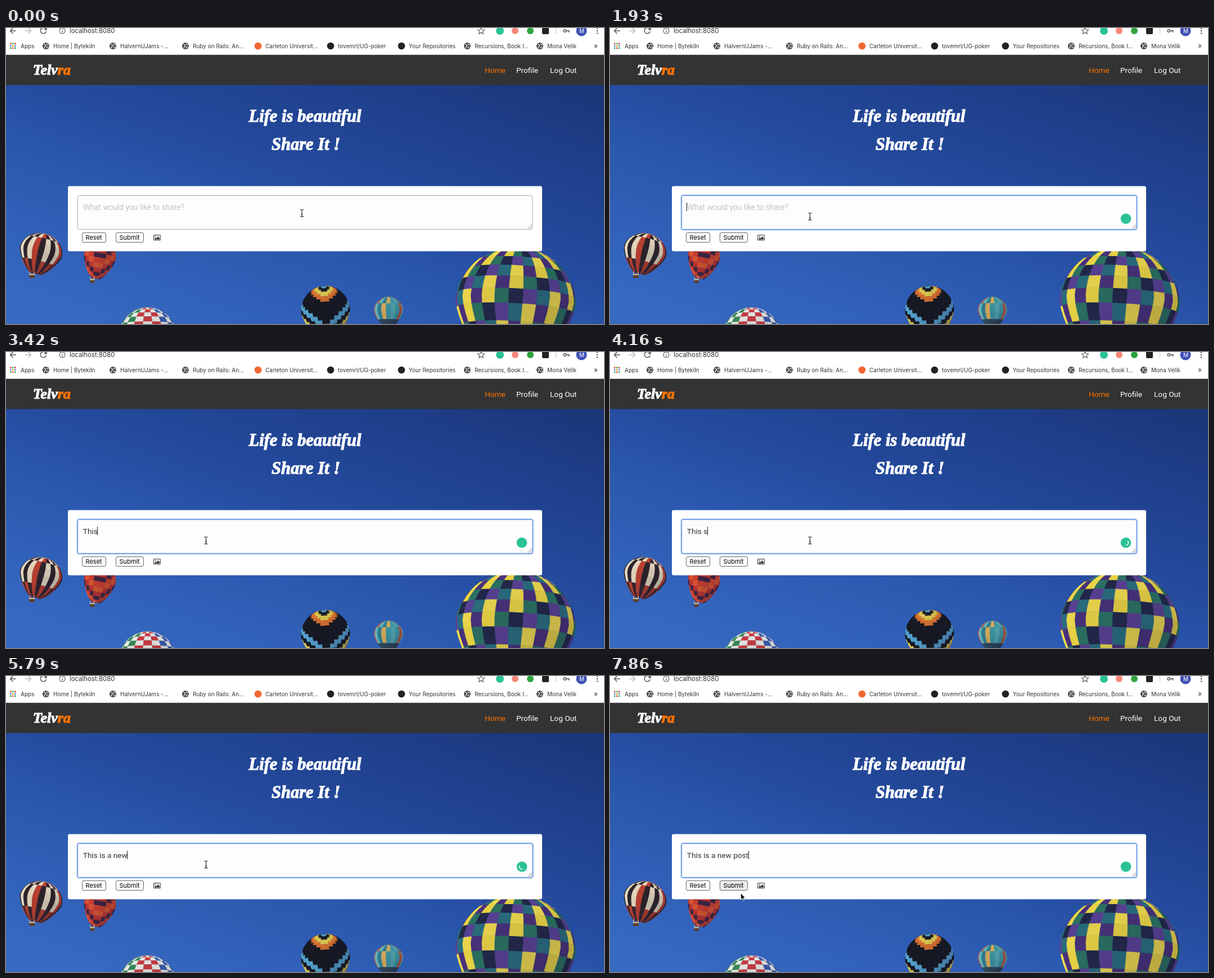
An HTML page that plays this animation: 1063 px wide and 527 px high, repeating every 8 s.

```html
<!DOCTYPE html>
<html lang="en">
<head>
<meta charset="utf-8">
<title>Share a post</title>
<style>
html, body { margin: 0; width: 100%; height: 100%; overflow: hidden; }
svg { display: block; width: 100vw; height: 100vh; }
text { white-space: pre; }
.ui { font: 10px Inter, sans-serif; fill: #333; }
.page { font: 13.65px Roboto, sans-serif; fill: #333; }
.script { font: italic bold 30.5px "Liberation Serif", serif; fill: #fff; stroke: #fff; stroke-width: 1.1; }
.line { fill: none; stroke: #555; stroke-width: 1.5; }
</style>
</head>
<body>
<svg viewBox="0 0 1063 527">
  <defs>
    <linearGradient id="sky" gradientUnits="userSpaceOnUse" x1="230" y1="550" x2="448" y2="-83">
      <stop offset="0" stop-color="#3769c1"/>
      <stop offset=".37" stop-color="#2a58ae"/>
      <stop offset=".54" stop-color="#254c9f"/>
      <stop offset=".8" stop-color="#1f408c"/>
      <stop offset="1" stop-color="#1b377a"/>
    </linearGradient>
  </defs>
  <rect width="1063" height="527" fill="url(#sky)"/>
  <g id="balloons"></g>

  <rect width="1063" height="48" fill="#fff"/>
  <rect y="47" width="1063" height="1" fill="#c8c8c8"/>
  <g class="line">
    <path d="M18 5H8M12.5 0L7.5 5l5 5"/>
    <path d="M34 5h10M39.5 0l5 5-5 5" stroke="#bbb"/>
    <path d="M71 2A5.2 5.2 0 1 0 71.5 6M72 -1v4h-4"/>
    <circle cx="100" cy="5" r="5" stroke-width="1.1"/>
    <path d="M100 4.5v3.5M100 2v1.2" stroke-width="1.2"/>
    <path d="M844.5 -1l1.7 4 4.3.3-3.3 2.8 1.1 4.2-3.8-2.3-3.8 2.3 1.1-4.2-3.3-2.8 4.3-.3z" stroke-width="1.1"/>
    <path d="M977.5 0v11" stroke="#ccc" stroke-width="1"/>
    <circle cx="993.5" cy="5" r="2.3"/><path d="M996 5h6M1000.5 5v3"/>
  </g>
  <circle cx="878" cy="5" r="7" fill="#2bc196"/>
  <circle cx="905" cy="5" r="6" fill="#f5877a"/>
  <circle cx="932" cy="5" r="6" fill="#2da33c"/>
  <rect x="953" y="-1" width="12" height="12" rx="2" fill="#222"/>
  <circle cx="1023" cy="5" r="9.5" fill="#3f51b5"/>
  <text x="1019" y="8.5" class="ui" style="fill:#fff">M</text>
  <g fill="#555"><circle cx="1051" cy=".5" r="1.3"/><circle cx="1051" cy="5" r="1.3"/><circle cx="1051" cy="9.5" r="1.3"/></g>
  <text x="113" y="9" class="ui" style="font-size:11.4px">localhost:8080</text>
  <g id="bookmarks" class="ui"></g>
  <text x="1045" y="36" class="ui" style="font-size:12px">»</text>

  <rect y="48" width="1063" height="53.5" fill="#333"/>
  <text x="48" y="82.5" class="script" style="font-size:26px">Telv<tspan fill="#ff7300" stroke="#ff7300">ra</tspan></text>
  <g class="page" style="fill:#fff">
    <text x="851" y="80" fill="#ff7300">Home</text>
    <text x="907" y="80">Profile</text>
    <text x="967" y="80">Log Out</text>
  </g>
  <g class="script" text-anchor="middle">
    <text x="531.5" y="167">Life is beautiful</text>
    <text x="533" y="217">Share It !</text>
  </g>

  <rect x="110" y="281.5" width="843" height="116" rx="3" fill="#fff"/>
  <rect id="glow" x="127" y="298" width="809.5" height="61" rx="3" fill="none" stroke="#5b95e8" stroke-opacity=".45" stroke-width="3.5"/>
  <rect id="box" x="127.5" y="298.5" width="808.5" height="60" rx="3" fill="#fdfdfd"/>
  <path d="M928 357l7-7M932 357l3-3" class="line" style="stroke:#888;stroke-width:1"/>
  <text id="hint" x="137" y="324" class="page" style="font-weight:300;font-size:13.9px;fill:#aaa">What would you like to share?</text>
  <text id="typed" x="136.8" y="324" class="page"></text>
  <rect id="caret" y="311" width="1" height="15" fill="#222"/>
  <g id="badge">
    <circle cx="917" cy="339.5" r="9.3" fill="#2bc196"/>
    <path id="spin" d="M920.2 336.3A4.5 4.5 0 0 1 917 344" fill="none" stroke="#fff" stroke-width="1.4"/>
  </g>
  <g fill="#fff" stroke="#666">
    <rect x="135.5" y="364.5" width="42" height="17" rx="2.5"/>
    <rect id="submit" x="195.5" y="364.5" width="49" height="17" rx="2.5"/>
  </g>
  <g class="ui" style="font-size:11px;fill:#000">
    <text x="141.5" y="377.3">Reset</text>
    <text x="201.5" y="377.3">Submit</text>
  </g>
  <rect x="262.5" y="368.7" width="12" height="9" rx="1" class="line" style="stroke-width:1.2"/>
  <path d="M264 376.500v-1.500l2-2 1.300 1.300 3.200-3.300 2.700 2.700v2.800z" fill="#444"/>
  <circle cx="265.5" cy="371.3" r="1" fill="#444"/>

  <path id="beam" d="M-3 -6.5Q0 -6.5 0 -4.5Q0 -6.5 3 -6.5M0 -5V5M-3 6.5Q0 6.5 0 4.5Q0 6.5 3 6.5M-1.5 2h3" fill="none" stroke="#222" stroke-width="1.1"/>
  <path id="arrow" d="M0 0v11l2.6-2.4 1.7 4 1.9-.8-1.7-3.9h3.5z" fill="#000" stroke="#fff" stroke-width=".8"/>
</svg>
<script>
const $ = id => document.getElementById(id);
const show = (id, on) => $(id).setAttribute('visibility', on ? 'visible' : 'hidden');

// Bookmarks: icon centre, icon colour (empty means a globe), label
const globe = x => `<circle cx="${x}" cy="32" r="6" fill="#444"/>
  <path d="M${x - 4} 29l3 1 1 2-2 1-1 3M${x + 1} 27.5l1 2 3 1M${x + 1} 36l1-2h3" fill="none" stroke="#fff" stroke-width="1.2"/>`;
const marks = [
  [71, '', 'Home | Bytekiln'], [190, '', 'HalvernUJams -...'], [319, '', 'Ruby on Rails: An...'],
  [448, '#f0652f', 'Carleton Universit...'], [577, '#222', 'tovemrl/UG-poker'], [703, '#222', 'Your Repositories'],
  [820, '', 'Recursions, Book I...'], [949, '', 'Mona Velik']
];
const dots = ['#e84335', '#f9ab00', '#34a853', '#4285f4'];
let bar = '<text x="26" y="35.5">Apps</text>';
for (let i = 0; i < 9; i++) {
  const row = Math.floor(i / 3);
  bar += `<rect x="${7 + i % 3 * 4}" y="${26.5 + row * 4}" width="2.6" height="2.6" fill="${dots[(i * 2 + row) % 4]}"/>`;
}
for (const [x, color, label] of marks)
  bar += (color ? `<circle cx="${x}" cy="32" r="6.3" fill="${color}"/>` : globe(x)) +
    `<text x="${x + 13}" y="35.5">${label}</text>`;
$('bookmarks').innerHTML = bar;

// Teardrop envelope of n gores and m rings; paint(i, j) colours a patch, shaded towards the lower right
function balloon(cx, top, w, h, tilt, n, m, bow, paint) {
  const end = Math.PI * .9;
  const drop = c => c > 0 ? 1 - c : 1 - 1.3 * c;
  const point = (u, v) => {
    const p = v * end, a = (u - .5) * Math.PI, c = Math.cos(p);
    const r = Math.sin(p) * (1 + .3 * Math.min(0, c));
    return (cx + w / 2 * r * Math.sin(a)).toFixed(1) + ' ' +
      (top + h * drop(c) / drop(Math.cos(end)) - bow * w * r * Math.cos(a)).toFixed(1);
  };
  let out = `<g transform="rotate(${tilt} ${cx} ${top + h / 2})" stroke-width=".4">`;
  for (let j = 0; j < m; j++) for (let i = 0; i < n; i++) {
    const pts = [[0, 0], [.5, 0], [1, 0], [1, .5], [1, 1], [.5, 1], [0, 1], [0, .5]]
      .map(([du, dv]) => point((i + du) / n, (j + dv) / m));
    const shade = 60 * (i / n) * (j / m);
    const color = `color-mix(in srgb, ${paint(i, j)}, #12142c ${shade.toFixed()}%)`;
    out += `<path d="M${pts.join('L')}Z" style="fill:${color};stroke:${color}"/>`;
  }
  return out + '</g>';
}
const basket = (x, y, w) =>
  `<path d="M${x - w / 2} ${y}L${x - w / 3} ${y + 5}M${x + w / 2} ${y}L${x + w / 3} ${y + 5}" stroke="#ddc9a8"/>
   <rect x="${x - w / 2}" y="${y + 4}" width="${w}" height="7" rx="1.5" fill="#5b4030"/>
   <rect x="${x - w / 2}" y="${y + 4}" width="${w}" height="2" fill="#d8bd8e"/>`;
const pick = (list, k) => list[Math.floor(k) % list.length];

const bands = ['#c8432f', '#2e2429', '#efe0c4', '#2e2429', '#efe0c4'];
const flames = ['#d9402e', '#e5592f', '#c93430', '#3f2643'];
const checks = ['#3b8b55', '#cf3b40', '#3c5fb0'];
const chevrons = ['#17181f', '#58a9d6', '#17181f', '#e8d34e', '#e5762c', '#17181f', '#17181f'];
const stripes = ['#3f9fac', '#c4573f', '#65bcc0', '#2f8194', '#e0b35c', '#3f9fac', '#58b0b8'];
const quilt = ['#f4de4e', '#4a327d', '#f0d945', '#2c7464', '#23284a', '#5b4296', '#2a6f80'];
$('balloons').innerHTML =
  balloon(166, 377, 57, 70, 11, 8, 12, .05, (i, j) => pick(flames, j + Math.abs(i - 3.5) + .5)) + basket(153.5, 443, 8) +
  balloon(61, 366, 77, 73, 14, 11, 7, .04, (i, j) => j > 4 ? pick(['#c8432f', '#39262a'], i) : pick(bands, i + (j > 1))) + basket(46, 434, 10) +
  balloon(252, 498, 104, 118, 0, 9, 13, .04, (i, j) => (i + j) % 2 ? '#eeeeea' : pick(checks, i / 3)) +
  balloon(568.5, 460, 87, 98, -4, 16, 22, .05, (i, j) => pick(chevrons, (j + Math.abs(i - 7.5)) / 2)) +
  balloon(680, 479, 52, 54, 0, 9, 8, .03, (i, j) => j > 5 ? '#30485c' : pick(stripes, i + j / 3)) +
  balloon(905, 391, 214, 226, 3, 13, 12, .06, (i, j) => pick(quilt, i + 2 * j));

// Cursor: time, x, y, arrow shape
const moves = [
  [0, 526, 329.5], [150, 468, 337], [290, 415, 342], [740, 400, 341], [890, 371, 338], [1030, 355.5, 335.5],
  [7270, 342, 344], [7420, 294, 374, 1], [7570, 250, 389, 1], [7720, 235, 375, 1], [7860, 232.5, 387, 1]
];
const keys = [
  [0, ''], [2820, 'T'], [2970, 'Th'], [3120, 'Thi'], [3420, 'This'], [3860, 'This '], [4160, 'This s'],
  [4310, 'This '], [4460, 'This i'], [4610, 'This is'], [4760, 'This is '], [4910, 'This is a'], [5050, 'This is a '],
  [5350, 'This is a n'], [5500, 'This is a ne'], [5640, 'This is a new'], [6080, 'This is a new '],
  [6380, 'This is a new po'], [6530, 'This is a new pos'], [6820, 'This is a new post']
];
const at = (list, t) => list.findLast(k => k[0] <= t);

function draw(t) {
  const [, x, y, arrow] = at(moves, t), text = at(keys, t)[1];
  const focus = t >= 1930, busy = t >= 4010 && t < 5940;
  const blink = t >= 2380 && t < 2820 || t >= 7270 && t < 7720;
  show('beam', !arrow);
  show('arrow', arrow);
  $(arrow ? 'arrow' : 'beam').setAttribute('transform', `translate(${x} ${y})`);
  $('typed').textContent = text;
  show('hint', !text);
  show('glow', focus);
  show('badge', focus);
  $('box').setAttribute('stroke', focus ? '#4580d6' : '#aaa');
  show('caret', focus && !blink);
  $('caret').setAttribute('x', Math.round(136.3 + (text ? $('typed').getComputedTextLength() : 0)));
  $('spin').setAttribute('display', busy ? 'inline' : 'none');
  const beat = Math.floor((t - 4160) / 148) * 148;
  $('spin').setAttribute('transform', `rotate(${beat / 700 * 360} 917 339.5)`);
  $('submit').setAttribute('fill', t >= 7720 ? '#ececec' : '#fff');
}
function loop(now) {
  draw(now % 8000);
  requestAnimationFrame(loop);
}
draw(0);
requestAnimationFrame(loop);
</script>
</body>
</html>
```
